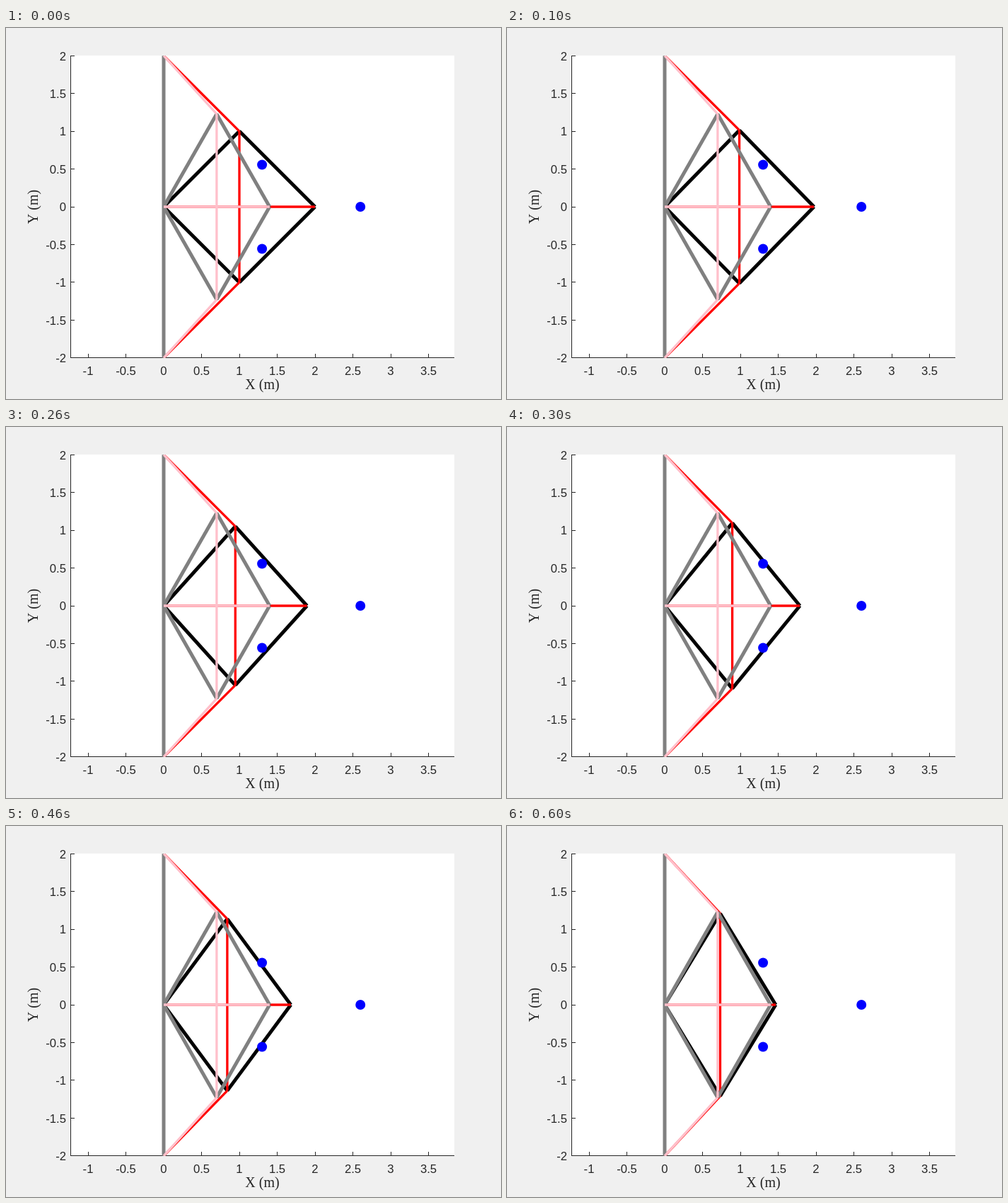
An HTML page with a canvas that plays this animation: 700 px wide and 525 px high, repeating every 0.7 s.

```html
<!DOCTYPE html>
<html lang="en">
<head>
<meta charset="utf-8">
<title>Linkage plot</title>
<style>
html, body { margin: 0; width: 100%; height: 100%; overflow: hidden; background: #f0f0f0; }
canvas { display: block; width: 700px; height: 525px; }
</style>
</head>
<body>
<canvas id="plot" width="700" height="525"></canvas>
<script>
const ctx = document.getElementById('plot').getContext('2d');
const INK = '#262626';
const BOX = { left: 91, top: 39, right: 634, bottom: 467 };
const STEP_MS = 100, STEPS = 7;
const px = x => 223 + 107 * x;
const py = y => 253 - 106.9 * y;

function line(x1, y1, x2, y2, color, width) {
  ctx.strokeStyle = color;
  ctx.lineWidth = width;
  ctx.beginPath();
  ctx.moveTo(px(x1), py(y1));
  ctx.lineTo(px(x2), py(y2));
  ctx.stroke();
}

// Four-bar rhombus with unit-square sides and its cables; x is the elbow position.
function linkage(x, bar, cable) {
  const y = Math.sqrt(2 - x * x);
  for (const s of [1, -1]) {
    line(0, 0, x, s * y, bar, 5);
    line(x, s * y, 2 * x, 0, bar, 5);
  }
  for (const s of [1, -1]) line(0, 2 * s, x, s * y, cable, 3.33);
  line(x, y, x, -y, cable, 3.33);
  line(0, 0, 2 * x, 0, cable, 3.33);
}

// Constant acceleration for two steps, then constant speed.
function elbow(step) {
  const travel = step < 2 ? step * step / 4 : step - 1;
  return 1 - travel * 0.16 / 3;
}

function axes() {
  ctx.fillStyle = INK;
  ctx.fillRect(BOX.left, BOX.top, 1, BOX.bottom - BOX.top);
  ctx.fillRect(BOX.left, BOX.bottom - 1, BOX.right - BOX.left, 1);
  ctx.font = '16.67px "Liberation Sans", Arial, sans-serif';
  ctx.textAlign = 'center';
  for (let v = -1; v <= 3.5; v += 0.5) {
    ctx.fillRect(Math.round(px(v) - 0.5), BOX.bottom - 6, 1, 6);
    ctx.fillText(String(v), px(v), 491);
  }
  ctx.textAlign = 'right';
  for (let v = -2; v <= 2; v += 0.5) {
    ctx.fillRect(BOX.left, Math.round(py(v) - 0.5), 6, 1);
    ctx.fillText(String(v), 85, py(v) + 6.3);
  }
  ctx.textAlign = 'center';
  ctx.font = '20px "Liberation Serif", "Times New Roman", serif';
  ctx.fillText('X (m)', 362.5, 511);
  ctx.save();
  ctx.translate(44.5, 253);
  ctx.rotate(-Math.PI / 2);
  ctx.fillText('Y (m)', 0, 0);
  ctx.restore();
}

function dot(x, y) {
  ctx.fillStyle = '#00f';
  ctx.beginPath();
  ctx.arc(px(x), py(y), 7, 0, 2 * Math.PI);
  ctx.fill();
}

function draw(step) {
  const w = BOX.right - BOX.left, h = BOX.bottom - BOX.top;
  ctx.fillStyle = '#f0f0f0';
  ctx.fillRect(0, 0, 700, 525);
  ctx.fillStyle = '#fff';
  ctx.fillRect(BOX.left, BOX.top, w, h);
  axes();
  ctx.save();
  ctx.beginPath();
  ctx.rect(BOX.left, BOX.top, w, h);
  ctx.clip();
  linkage(elbow(step), '#000', '#f00');
  line(0, -2, 0, 2, '#808080', 5);
  linkage(0.7, '#808080', '#ffc0cb');
  dot(1.3, 0.557);
  dot(1.3, -0.557);
  dot(2.6, 0);
  ctx.restore();
}

const start = performance.now();
function tick() {
  const t = performance.now() - start;
  draw(Math.floor(t / STEP_MS) % STEPS);
  requestAnimationFrame(tick);
}
tick();
</script>
</body>
</html>
```
